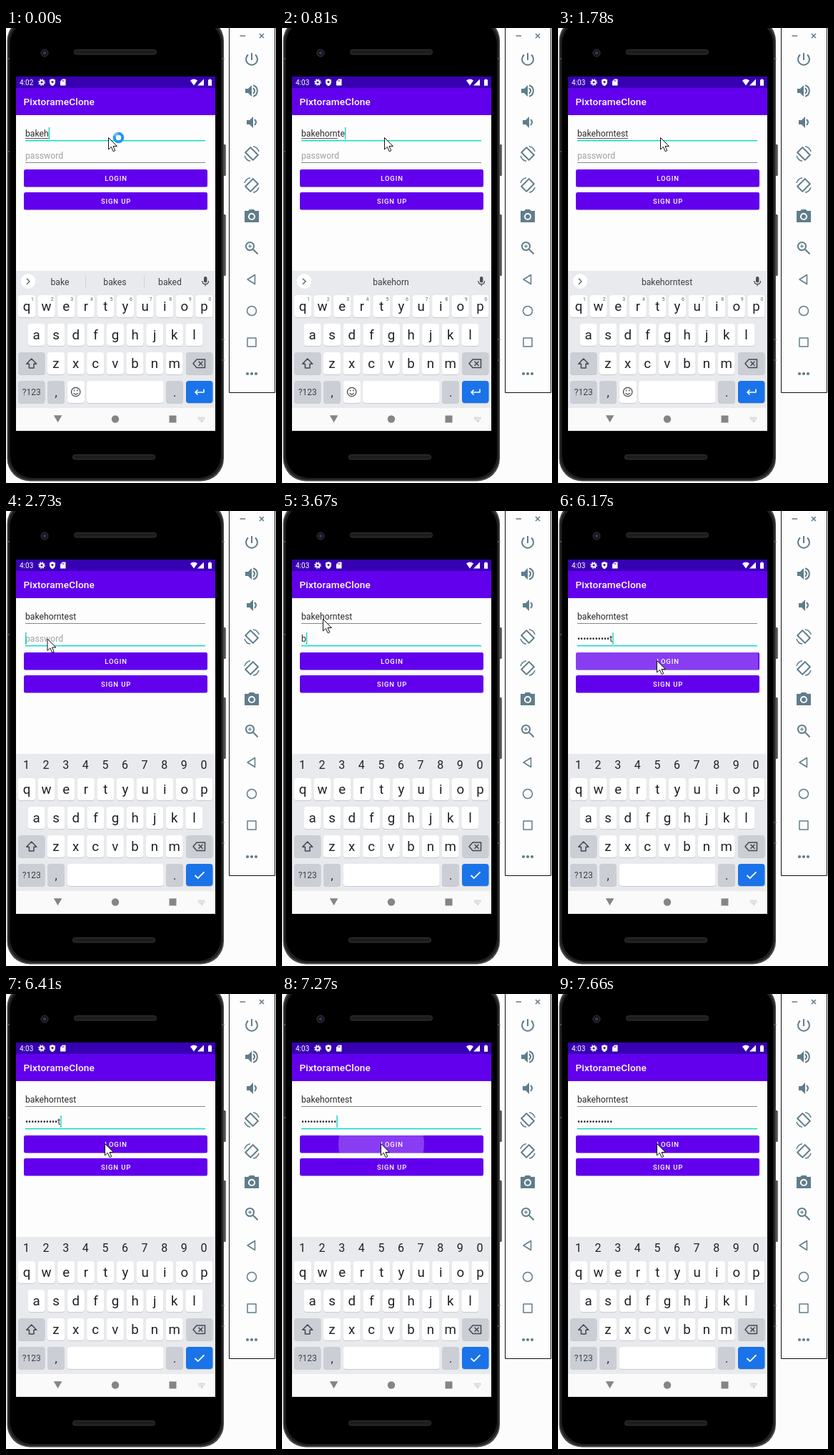
An HTML page that plays this animation: 378x637 px, repeating every 8000 ms.

```html
<!DOCTYPE html>
<html lang="en">
<head>
<meta charset="utf-8">
<title>Login screen</title>
<style>
html, body { margin: 0; width: 100%; height: 100%; overflow: hidden; background: #fcfcfc; }
svg { display: block; width: 378px; height: 637px; font-family: Roboto, sans-serif; }
.mid { text-anchor: middle; }
.ln { fill: none; stroke-linejoin: round; }
.btn { font-size: 9.5px; font-weight: 500; letter-spacing: .85px; fill: #fff; text-anchor: middle; }
.edit { font-size: 12.2px; fill: #2b2b2b; }
</style>
</head>
<body>
<svg viewBox="0 0 378 637">
  <defs>
    <clipPath id="loginClip"><rect x="25" y="198" width="257" height="24.5" rx="2.5"/></clipPath>
    <linearGradient id="side"><stop stop-color="#222"/><stop offset="1" stop-color="#777"/></linearGradient>
  </defs>

  <!-- phone body -->
  <g fill="url(#side)">
    <rect x="303" y="163" width="5" height="44" rx="1.5"/>
    <rect x="303" y="261" width="5" height="86" rx="1.5"/>
  </g>
  <rect x="1.5" y="-14" width="303.5" height="648.5" rx="32" fill="#444"/>
  <rect x="3" y="-12" width="300.5" height="644.5" rx="32" fill="#1e1e1e"/>
  <rect x="5.5" y="-10" width="295.5" height="640" rx="32" fill="#000"/>
  <path d="M1 43h4M1 173h4M302 43h4M302 436h4M302 465h4" stroke="#777"/>
  <circle cx="54" cy="35" r="5" fill="#12131b" stroke="#3a3a3e"/><circle cx="54" cy="35" r="2.2" fill="#2c3866"/>
  <g fill="#1d1d1d" stroke="#343434">
    <rect x="95.5" y="30.5" width="115" height="6.5" rx="3"/>
    <rect x="93.5" y="597.5" width="115" height="6.5" rx="3"/>
  </g>

  <!-- app -->
  <rect x="14" y="68" width="279" height="496" fill="#fdfdfd"/>
  <rect x="14" y="68" width="279" height="16" fill="#3700b3"/>
  <rect x="14" y="84" width="279" height="38" fill="#6200ee"/>
  <text id="clock" x="19" y="80" font-size="10" fill="#fff"></text>
  <g fill="#fff">
    <circle cx="50" cy="76" r="2.6" fill="none" stroke="#fff" stroke-width="2"/>
    <circle cx="50" cy="76" r="4.2" fill="none" stroke="#fff" stroke-width="1.3" stroke-dasharray="1.7 1.6"/>
    <path d="M65 71l4 1.6v3q0 4-4 5.6q-4-1.6-4-5.6v-3z"/><circle cx="65" cy="75.6" r="1.5" fill="#3700b3"/>
    <path d="M79 71.5h4.5v9h-7.5v-6z"/><path d="M79 73v2m1.8-2v2" stroke="#3700b3" stroke-width=".8"/>
    <path d="M258 73.6q5-4 10 0l-5 7z"/><path d="M277 71.5v9h-9z"/>
    <path d="M283 72.4h1.4v-1h2.2v1h1.4v8.4h-5z"/>
  </g>
  <text x="24.5" y="108" font-size="13.6" font-weight="500" letter-spacing=".17" fill="#fff">PixtorameClone</text>

  <text id="user" class="edit" x="27" y="152"></text>
  <rect id="userMark" x="27" y="154" height="1" fill="#555"/>
  <rect id="userLine" x="27"/>
  <text id="pass" class="edit" x="27" y="183"></text>
  <rect id="passLine" x="27"/>
  <rect id="caret" width="1.4" height="17" fill="#19d3c3"/>

  <g fill="#6200ee">
    <rect x="25" y="198.6" width="257" height="24.5" rx="2.5" fill="#dcdce0"/>
    <rect x="25" y="230.6" width="257" height="24.5" rx="2.5" fill="#dcdce0"/>
    <rect x="25" y="198" width="257" height="24.5" rx="2.5"/>
    <rect x="25" y="230" width="257" height="24.5" rx="2.5"/>
  </g>
  <text class="btn" x="154" y="213.8">LOGIN</text>
  <text class="btn" x="154" y="245.8">SIGN UP</text>
  <circle id="ripple" cx="139" cy="210" fill="#fff" clip-path="url(#loginClip)"/>

  <!-- keyboard -->
  <rect x="14" y="340" width="279" height="192" fill="#e8eaed"/>
  <g id="keys"></g>
  <g id="words">
    <circle cx="31" cy="354.5" r="10.3" fill="#fff"/>
    <path class="ln" d="M29 350.7l4 4-4 4" stroke="#5f6368" stroke-width="1.4"/>
    <path id="bars" d="M111.5 347v16M193.5 347v16" stroke="#cdd0d4"/>
    <g class="mid" font-size="12.2" fill="#3c4043">
      <text id="word0" x="75.5" y="359.5"></text><text id="word1" x="152.5" y="359.5"></text><text id="word2" x="229.5" y="359.5"></text>
    </g>
    <rect x="277" y="348" width="4.4" height="8.4" rx="2.2" fill="#4a4d51"/>
    <path class="ln" d="M274.8 354q0 4.6 4.4 4.6t4.4-4.6M279.2 358.6v2.6" stroke="#4a4d51" stroke-width="1.3"/>
  </g>
  <g id="digits" class="mid" font-size="16" fill="#2f3236"></g>

  <!-- navigation bar -->
  <rect x="14" y="532" width="279" height="32" fill="#fafafa"/>
  <g fill="#858585">
    <path d="M66.8 542.3h11.6l-5.8 10z"/><circle cx="153" cy="547.5" r="5.2"/><rect x="228.5" y="542.5" width="10" height="10"/>
    <path d="M269 545.2h10m-10 2h10m-8 2h6" stroke="#aaa" stroke-width="1.1" stroke-dasharray="1.2 .8"/>
    <path d="M272.6 550.6h3l-1.5 1.5z" fill="#aaa"/>
  </g>

  <!-- emulator toolbar -->
  <path d="M312.5 0V510.5H376.5V0" fill="#fdfdfd" stroke="#111"/>
  <g id="tools" class="ln" stroke="#607d8b" stroke-width="2"></g>

  <g id="busy"><circle cx="157.5" cy="153.5" r="5.8" fill="#f6fbff" stroke="#2196f3" stroke-width="4"/>
    <path class="ln" d="M152 151.5a5.8 5.8 0 0 1 5-4" stroke="#6fc0fa" stroke-width="3"/></g>
  <path id="mouse" d="M0 0v16.5l3.9-3.6 2.8 6.4 2.6-1.1-2.8-6.2h5.4z" fill="#fff" stroke="#111" stroke-width="1"/>
</svg>
<script>
const $ = id => document.getElementById(id);
const LOOP = 8000, NAME = "bakehorntest", PITCH = 27.6;
const FOCUS = 2590;   // the password field takes over

// keyboard
const key = (x, y, w, fill = "#fff") =>
  `<rect x="${x}" y="${y + 1}" width="${w}" height="31" rx="4" fill="#c6c9ce"/>` +
  `<rect x="${x}" y="${y}" width="${w}" height="31" rx="4" fill="${fill}"/>`;
const label = (x, y, s, size, fill = "#202124") =>
  `<text class="mid" x="${x}" y="${y}" font-size="${size}" fill="${fill}">${s}</text>`;
const row = (letters, x0, y) => [...letters].map((c, i) =>
  key(x0 + i * PITCH - 12, y, 24) + label(x0 + i * PITCH, y + 22, c, 18.7)).join("");
const icon = (d, color = "#44474b", w = 1.5) =>
  `<path class="ln" d="${d}" stroke="${color}" stroke-width="${w}"/>`;
const GREY = "#cbced4", numbers = [..."1234567890"];

$("keys").innerHTML =
  row("qwertyuiop", 29, 374) + row("asdfghjkl", 42.6, 414) + row("zxcvbnm", 70, 454) +
  key(17, 454, 37.5, GREY) + icon("M35.7 463l7 7.3h-3.7v5.7h-6.6v-5.7h-3.7z") +
  key(252, 454, 37.5, GREY) + icon("M267 464h11.5v11.5h-11.5l-5-5.75zM269.5 466.8l6 6m0-6l-6 6") +
  key(17, 494, 37.5, GREY) + label(35.7, 514, "?123", 12, "#3c4043") +
  key(58, 494, 24, GREY) + label(70, 516, ",", 16) +
  key(224, 494, 24, GREY) + label(236, 516, ".", 16) +
  key(252, 494, 37.5, "#1a73e8") +
  `<g id="textKeys">` + key(86, 494, 24) + key(113, 494, 107.5) +
  icon("M91.5 509.5a6.2 6.2 0 1 0 12.4 0a6.2 6.2 0 1 0 -12.4 0M94.6 511.2q3.1 3.6 6.2 0M95.5 506.5v2m4.4-2v2", "#44474b", 1.3) +
  icon("M277 505.5v4.5h-12m3.5-3.5l-3.5 3.5 3.5 3.5", "#fff", 1.6) +
  numbers.map((n, i) => label(37 + i * PITCH, 382, n, 7, "#5f6368")).join("") + `</g>` +
  `<g id="passKeys">` + key(86, 494, 134.5) + icon("M264.5 510l4.2 4.2 8.8-8.8", "#fff", 1.8) + `</g>`;
$("digits").innerHTML = numbers.map((n, i) => label(28.5 + i * PITCH, 361, n, 16)).join("");

// toolbar icons, one every 44 px, drawn around their centres
const turn = flip => `<g transform="scale(${flip} 1)"><path d="M-5 -7.5h10v15h-10z" transform="rotate(-45)"/>` +
  `<path d="M2 -10.3q6 1 8 7.3M-2 10.3q-6 -1 -8 -7.3" stroke-width="1.5"/></g>`;
const tools = [
  `<path d="M0 -9v10M-5 -6.6a8 8 0 1 0 10 0"/>`,
  `<path d="M-9 -3h4l5 -5v16l-5 -5h-4z" fill="#607d8b" stroke="none"/><path d="M2 -4q4 4 0 8M2 -7.7a8 8 0 0 1 0 15.4"/>`,
  `<path d="M-7 -3h4l5 -5v16l-5 -5h-4z" fill="#607d8b" stroke="none"/><path d="M4 -4q4 4 0 8"/>`,
  turn(1),
  turn(-1),
  `<path d="M-10 -8h5.2l1.8 -2h6l1.8 2h5.2v16h-20z" fill="#607d8b" stroke="none"/><circle r="4.1" stroke="#fdfdfd"/>`,
  `<circle cx="-2.5" cy="-2.5" r="5.6"/><path d="M1.8 1.8l6.7 6.7"/><path d="M-5 -2.5h5m-2.5 -2.5v5" stroke-width="1.2"/>`,
  `<path d="M4.5 -6.5v13l-10.5 -6.5z" stroke-width="1.5"/>`,
  `<circle r="6.5" stroke-width="1.5"/>`,
  `<path d="M-6 -6h12v12h-12z" stroke-width="1.5"/>`,
  [-6, 0, 6].map(x => `<circle cx="${x}" r="2.1" fill="#607d8b" stroke="none"/>`).join("")
];
$("tools").innerHTML =
  `<path d="M327.5 11h7.5M355 8l6 6m0 -6l-6 6" stroke-width="1.6"/>` +
  tools.map((t, i) => `<g transform="translate(344 ${44 + 44 * i})">${t}</g>`).join("");

// last entry of [time, ...values] that has begun
const at = (steps, t) => steps.filter(s => s[0] <= t).pop().slice(1);
const mousePath = [[0, 143.5, 153.5], [2060, 130, 160], [2190, 100, 170], [2320, 72, 177], [2450, 58, 179],
  [2850, 58, 165], [2990, 57.5, 151.5], [5780, 84, 169], [5900, 117, 196], [6040, 138.5, 209.5]];
const rippleSteps = [[0, 0, 0], [6040, 60, .24], [6170, 141.5, .24], [6290, 260, .12], [6410, 0, 0],
  [7250, 60, .24], [7390, 141.5, .24], [7520, 260, .12], [7660, 0, 0]];
const passCount = [[0, 0], [3670, 1], [3820, 2], [3940, 3], [4060, 4], [4340, 5], [4520, 6], [4700, 8],
  [4880, 9], [5050, 11], [5230, 12]];
const caretSteps = [[0, 1], [1780, 0], [2320, 1], [FOCUS, 0], [2720, 1], [3270, 0], [3670, 1],
  [5630, 0], [6170, 1], [6660, 0], [7120, 1], [7660, 0]];

const typed = t => Math.max(5, Math.min(12, 5 + Math.floor((t - 120) / 137)));
const show = (id, on) => $(id).style.display = on ? "" : "none";
const set = (id, attrs) => { for (const k in attrs) $(id).setAttribute(k, attrs[k]); };
const line = (id, y, on) => set(id, { y, width: 252,
  height: on ? 1.4 : 1, fill: on ? "#03dac5" : "#858585" });

function draw(t) {
  const inPass = t >= FOCUS, n = typed(t);
  $("clock").textContent = t < 531 ? "4:02" : "4:03";
  show("busy", t < 120);

  const user = $("user");
  user.textContent = NAME.slice(0, n);
  const marked = typed(t - 150);
  set("userMark", { width: user.getSubStringLength(0, Math.min(marked, n)) });
  show("userMark", !inPass);
  line("userLine", 157, !inPass);
  line("passLine", 188, inPass);

  const [count] = at(passCount, t), pass = $("pass");
  const last = t < 6660 ? NAME[count - 1] : "•";
  pass.textContent = count ? "•".repeat(count - 1) + last : "password";
  pass.style.fill = count ? "" : "#a0a0a0";

  const end = inPass ? (count ? pass.getComputedTextLength() : 0) : user.getComputedTextLength();
  set("caret", { x: 27 + end, y: inPass ? 170 : 139 });
  show("caret", at(caretSteps, t)[0]);

  const hint = typed(t - 270), many = hint < 6;
  const words = many ? ["bake", "bakes", "baked"] : ["", NAME.slice(0, hint), ""];
  words.forEach((w, i) => $("word" + i).textContent = w);
  show("bars", many);
  show("words", !inPass);
  show("textKeys", !inPass);
  show("digits", inPass);
  show("passKeys", inPass);

  const [r, opacity] = at(rippleSteps, t);
  set("ripple", { r, opacity });
  const [x, y] = at(mousePath, t);
  set("mouse", { transform: `translate(${x} ${y})` });
}

let start;
function tick(now) {
  start ??= now;
  draw((now - start) % LOOP);
  requestAnimationFrame(tick);
}
draw(0);
requestAnimationFrame(tick);
</script>
</body>
</html>
```
